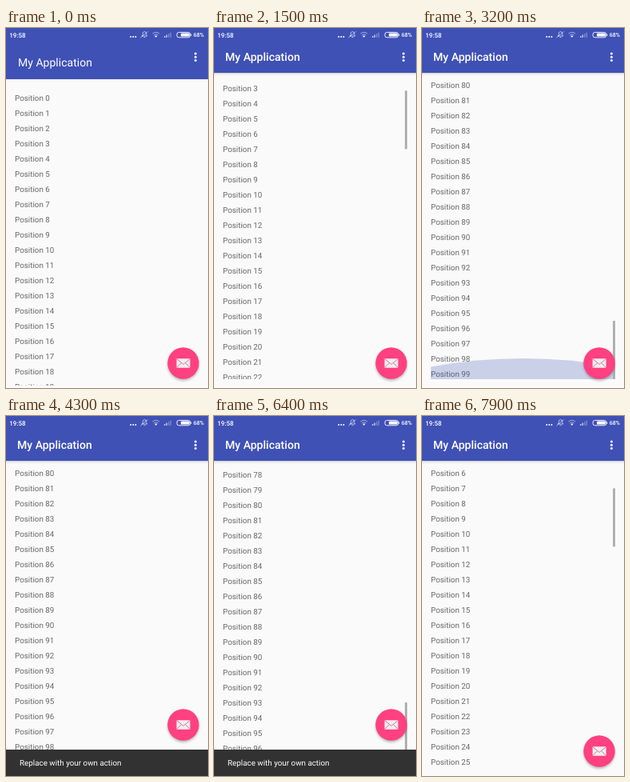
Recreate the animation shown at these times as an HTML page. Size 253 by 450 pixels, loop 8000 ms.

```html
<!DOCTYPE html>
<html lang="en">
<head>
<meta charset="utf-8">
<title>Scrolling list</title>
<style>
  html, body { margin: 0; width: 100%; height: 100%; overflow: hidden; background: #fafafa; }
  svg { display: block; width: 253px; height: 450px; font-family: Roboto, sans-serif; text-rendering: geometricPrecision; }
  #rows { font-size: 9.84px; fill: #686868; }
  #title { font-size: 14.06px; fill: #fff; }
  #fab { filter: drop-shadow(0 2px 1.5px rgba(0, 0, 0, .26)); }
</style>
</head>
<body>
<svg viewBox="0 0 253 450">
  <defs>
    <clipPath id="view"><rect id="viewRect" x="5" y="66.5" width="243" height="372.5"/></clipPath>
    <linearGradient id="shade" x2="0" y2="1">
      <stop stop-opacity=".2"/>
      <stop offset=".4" stop-opacity=".06"/>
      <stop offset="1" stop-opacity="0"/>
    </linearGradient>
  </defs>
  <rect width="253" height="450" fill="#fafafa"/>

  <g clip-path="url(#view)">
    <g id="rows"></g>
    <path id="glow" fill="#3f51b5"/>
    <rect id="bar" x="239" width="3" height="73" fill="#b0b0b0"/>
  </g>

  <rect id="shadow" width="253" height="4" fill="url(#shade)"/>
  <rect id="header" width="253" height="64" fill="#3f51b5"/>
  <text id="title">My Application</text>
  <g fill="#fff">
    <circle cx="237.4" cy="32" r="1.5"/>
    <circle cx="237.4" cy="36.3" r="1.5"/>
    <circle cx="237.4" cy="40.6" r="1.5"/>
  </g>

  <g fill="#fff">
    <text x="4.3" y="11.6" font-size="8" font-weight="500">19:58</text>
    <text x="234.7" y="11.2" font-size="7" font-weight="500">68%</text>
    <circle cx="156.2" cy="11" r="1"/>
    <circle cx="159.3" cy="11" r="1"/>
    <circle cx="162.4" cy="11" r="1"/>
    <path d="M170 10 L171.2 8.8 V7 Q171.4 4.6 173.5 4.6 Q175.6 4.6 175.8 7 V8.8 L177 10 Z M172.4 11.6 H174.6 M177.5 4.5 L168.5 12" fill="none" stroke="#fff" stroke-width=".8" opacity=".75"/>
    <path d="M187.8 12 L186.2 10 Q187.8 8.8 189.4 10 Z"/>
    <path d="M185.1 8.9 Q187.8 6.9 190.5 8.9 M183.4 7 Q187.8 3.8 192.2 7" fill="none" stroke="#fff" opacity=".5"/>
    <path d="M198 12 V10 H199.5 V12 Z M200.5 12 V8.5 H202 V12 Z" opacity=".65"/>
    <path d="M203 12 V7 H204.5 V12 Z M205.5 12 V5.5 H207 V12 Z" opacity=".3"/>
    <rect x="214" y="5.4" width="16.8" height="6.4" rx="2.6" fill="none" stroke="#fff" stroke-width=".9"/>
    <rect x="219" y="6.6" width="10.8" height="4" rx="1.2"/>
    <rect x="231.3" y="7.4" width="1" height="2.4"/>
  </g>

  <g id="snack">
    <rect y="417" width="253" height="34" fill="#323232"/>
    <text id="message" x="17" y="437.3" font-size="9.84" fill="#fff">Replace with your own action</text>
  </g>

  <g id="fab">
    <circle cx="222" cy="419" r="19.7" fill="#ff4081"/>
    <circle id="ripple" cx="222" cy="419" fill="#fff"/>
    <rect x="213.6" y="413.2" width="17" height="11.6" rx=".6" fill="#f1eeee"/>
    <path d="M213.8 413.6 L222.1 420.4 L230.4 413.6 M213.8 424.5 L219.6 418.6 M230.4 424.5 L224.6 418.6" fill="none" stroke="#c85c86" stroke-width=".8"/>
  </g>
</svg>
<script>
const LOOP = 8000, STEP = 100, PITCH = 19, VIEW = 372.5, CONTENT = 1900;
const el = id => document.getElementById(id);
const set = (id, attrs) => {
  for (const k in attrs) el(id).setAttribute(k, attrs[k]);
};

const linear = p => p;
const easeIn = p => p * p;
const smooth = p => p * p * (3 - 2 * p);
const ramp = (t, from, to, ease = linear) =>
  ease(Math.min(1, Math.max(0, (t - from) / (to - from))));

// Two drags and a fling down to the end, then a drag and a fling back up
const scrollAt = t =>
  60.5 * ramp(t, 1000, 1500, easeIn) +
  267 * ramp(t, 1500, 2200) +
  1200 * ramp(t, 2200, 3100, easeIn) -
  40 * ramp(t, 6000, 6400, easeIn) -
  1365.5 * ramp(t, 6400, 7900, smooth);

for (let i = 0; i < CONTENT / PITCH; i++) {
  const row = document.createElementNS("http://www.w3.org/2000/svg", "text");
  row.textContent = "Position " + i;
  row.setAttribute("x", 11);
  row.setAttribute("y", 82.5 + i * PITCH);
  el("rows").append(row);
}

function render(t) {
  const s = scrollAt(t), c = ramp(t, 700, 1000), drop = 8 * (1 - c);
  const barAlpha = ramp(t, 900, 1000) - ramp(t, 3400, 3700) + ramp(t, 6000, 6100);
  set("viewRect", { y: 66.5 + drop });
  set("rows", { transform: `translate(0 ${drop - s})` });
  set("bar", { y: 66.5 + drop + s * VIEW / CONTENT, opacity: barAlpha });
  set("header", { height: 56 + drop });
  set("shadow", { y: 56 + drop, opacity: .3 + .7 * c });
  set("title", { x: 15 - c, y: 48.2 - 7 * c, "font-weight": c < .5 ? 400 : 500 });

  const h = 26 * (ramp(t, 3000, 3200) - ramp(t, 3200, 3700)), side = 439 - h * .6;
  set("glow", {
    d: `M11 439 V${side} Q126.5 ${2 * (439 - h) - side} 242 ${side} V439 Z`,
    opacity: h / 104
  });

  const shown = ramp(t, 3900, 4150, smooth) - ramp(t, 6950, 7200, smooth);
  set("snack", { transform: `translate(0 ${34 * (1 - shown)})` });
  set("message", { opacity: shown });
  set("fab", { transform: `translate(0 ${-33 * shown})` });
  set("ripple", { r: 19.7 * ramp(t, 3800, 4000), opacity: .22 * (1 - ramp(t, 3900, 4300)) });
}

const start = performance.now();
function tick() {
  const t = (performance.now() - start) % LOOP;
  render(Math.floor(t / STEP) * STEP);
  requestAnimationFrame(tick);
}
tick();
</script>
</body>
</html>
```
